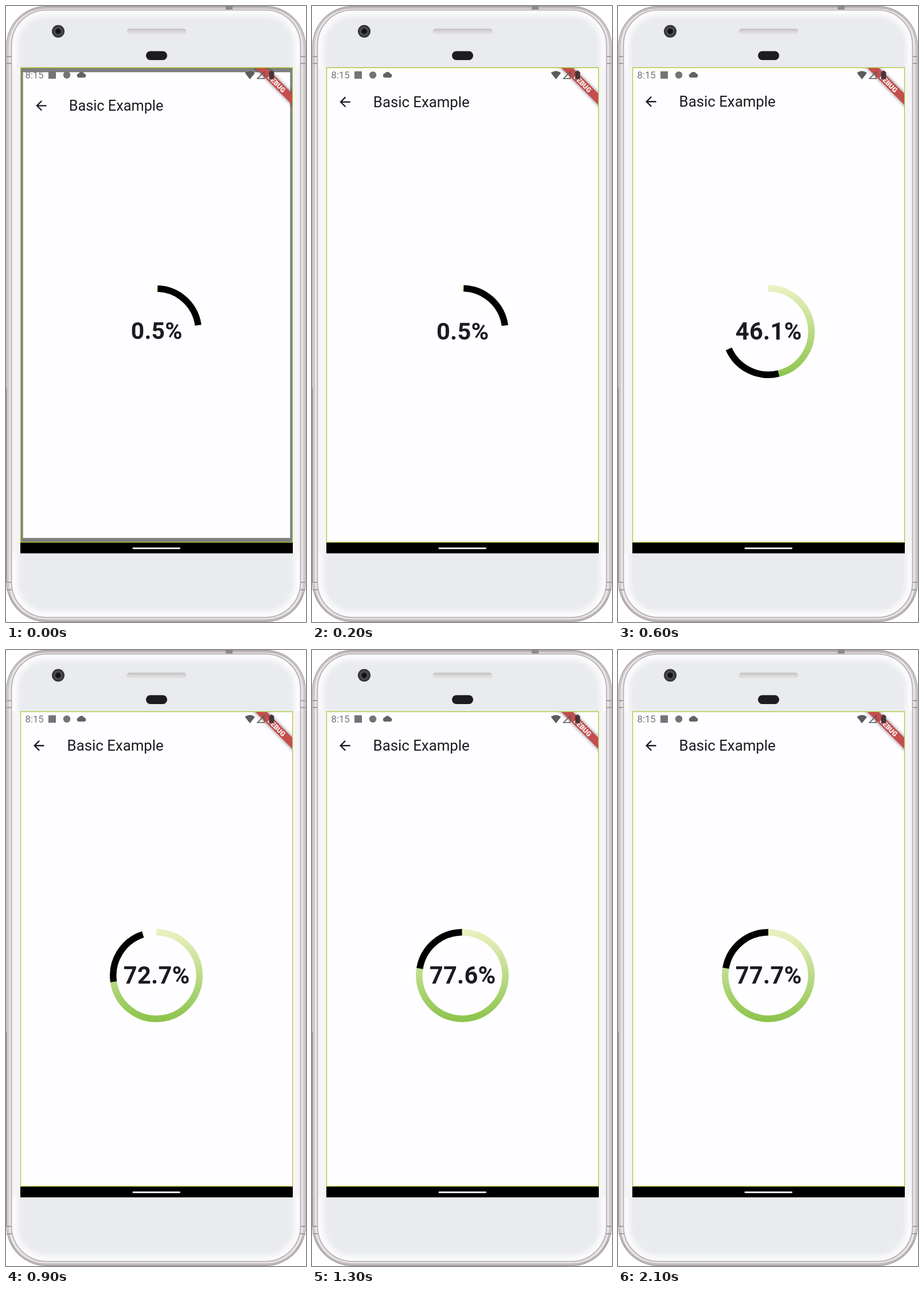
Write an HTML page that moves like this. It is 523 px wide and 1071 px high and loops after 2200 ms.

```html
<!DOCTYPE html>
<html lang="en">
<head>
<meta charset="utf-8">
<title>Circular progress</title>
<style>
  html, body { margin: 0; width: 100%; height: 100%; overflow: hidden; background: #fff; }
  svg { display: block; width: 100vw; height: 100vh; }
  text { font-family: Roboto, "Open Sans", sans-serif; }
</style>
</head>
<body>
<svg viewBox="0 0 523 1071" preserveAspectRatio="none">
  <defs>
    <linearGradient id="lime" gradientUnits="userSpaceOnUse" x1="0" y1="485" x2="0" y2="647">
      <stop offset="0" stop-color="#ecf2c3"/>
      <stop offset="1" stop-color="#8bc34a"/>
    </linearGradient>
    <linearGradient id="metal" x1="0" y1="0" x2="0" y2="1">
      <stop offset="0" stop-color="#bfb9bb"/>
      <stop offset=".07" stop-color="#ddd6d9"/>
      <stop offset=".94" stop-color="#ddd6d9"/>
      <stop offset=".965" stop-color="#b0aaac"/>
      <stop offset="1" stop-color="#c2bcbe"/>
    </linearGradient>
    <linearGradient id="slot" x1="0" y1="0" x2="0" y2="1">
      <stop offset="0" stop-color="#bfbabb"/>
      <stop offset=".4" stop-color="#d8d4d5"/>
      <stop offset="1" stop-color="#e6e3e4"/>
    </linearGradient>
    <radialGradient id="lens">
      <stop offset="0" stop-color="#08080a"/>
      <stop offset=".4" stop-color="#1c1d22"/>
      <stop offset=".55" stop-color="#55565c"/>
      <stop offset=".75" stop-color="#3c3d42"/>
      <stop offset="1" stop-color="#2d2d31"/>
    </radialGradient>
    <filter id="soft" x="-10%" y="-10%" width="120%" height="120%"><feGaussianBlur stdDeviation="4"/></filter>
    <filter id="shade" x="-20%" y="-100%" width="140%" height="300%"><feGaussianBlur stdDeviation="3"/></filter>
    <clipPath id="faceClip"><rect x="11" y="8" width="501" height="1054" rx="60"/></clipPath>
    <clipPath id="screenClip"><rect x="25" y="107" width="475" height="826"/></clipPath>
  </defs>

  <!-- phone body -->
  <rect width="523" height="1071" fill="#fff"/>
  <rect x="1" y=".5" width="521" height="1070" rx="69" fill="url(#metal)" stroke="#958f91"/>
  <rect x="4" y="4" width="515" height="1063" rx="65" fill="#e9e4e6" stroke="#bab3b6"/>
  <g fill="#a19b9d">
    <path d="M1 87h9v2H1zM1 99h9v2H1zM513 87h9v2h-9zM513 99h9v2h-9z"/>
    <path d="M1 1001h9v2H1zM1 1014h9v2H1zM513 1001h9v2h-9zM513 1014h9v2h-9z"/>
  </g>
  <rect x="383" y="0" width="12" height="6" fill="#8d888a"/>
  <rect x="0" y="664" width="1.5" height="338" fill="#9b9597"/>
  <rect x="9.5" y="7" width="504" height="1056" rx="61" fill="#e9ebee" stroke="#b3acaf" stroke-width="1.5"/>
  <g clip-path="url(#faceClip)">
    <rect x="11" y="8" width="501" height="1054" rx="60" fill="none" stroke="#fbfafc" stroke-width="19" filter="url(#soft)"/>
    <rect x="11" y="107" width="14" height="844" fill="#f6f4f7"/>
    <rect x="500" y="107" width="12" height="844" fill="#f6f4f7"/>
  </g>
  <circle cx="91" cy="44" r="11" fill="url(#lens)"/>
  <rect x="210.5" y="39.5" width="104" height="9.5" rx="4.7" fill="url(#slot)"/>
  <rect x="244" y="78.5" width="37" height="15.5" rx="7.5" fill="#1d1d20"/>

  <!-- screen -->
  <rect x="25" y="933" width="475" height="18.6" fill="#000"/>
  <rect x="220.5" y="941.5" width="83.5" height="2.7" rx="1.35" fill="#fff"/>
  <g clip-path="url(#screenClip)">
    <rect x="25" y="107" width="475" height="826" fill="#808080"/>
    <g id="page">
      <rect x="25" y="107" width="475" height="826" fill="#fefdff"/>
      <path transform="translate(43.4 152.4) scale(1.155)" fill="#1d1b20"
        d="M20 11H7.83l5.59-5.59L12 4l-8 8 8 8 1.41-1.41L7.83 13H20z"/>
      <text x="106.6" y="175" font-size="25.8" fill="#1d1b20">Basic Example</text>
      <path id="done" fill="none" stroke="url(#lime)" stroke-width="11.5"/>
      <path id="head" fill="none" stroke="#000" stroke-width="11.5"/>
      <text id="label" x="262.7" y="580" text-anchor="middle" font-size="41.6" font-weight="600" letter-spacing=".29" fill="#1d1b20"></text>
    </g>
    <g transform="translate(499.5 107) rotate(45)">
      <rect x="-60" y="32.3" width="120" height="13.9" fill="#000" opacity=".5" filter="url(#shade)"/>
      <rect x="-60" y="32.3" width="120" height="13.9" fill="#c54d4d"/>
      <text x="0" y="43.5" text-anchor="middle" font-size="11.8" font-weight="900" fill="#fff">DEBUG</text>
    </g>
  </g>

  <!-- status bar -->
  <g fill="#747476">
    <text x="33.6" y="126.4" font-size="16.6">8:15</text>
    <rect x="74" y="113.5" width="13" height="13"/>
    <circle cx="106" cy="120" r="6.2"/>
    <path d="M127 124.5a3.7 3.7 0 0 1-.2-7.3 5.2 5.2 0 0 1 9.4.4 3.5 3.5 0 0 1 .3 6.9z" fill="#626264"/>
    <path d="M416.5 116.3q8.8-6.6 17.6 0L425.3 127.5z" fill="#5c5c5e"/>
    <path d="M438.5 126.3h11.8v-12.2z" fill="none" stroke="#5c5c5e" stroke-width="1.6"/>
    <path d="M461 112.5h4v1.7h2.3v13.2h-8.6v-13.2h2.3z" fill="#493437"/>
  </g>
  <rect x="25.5" y="107.2" width="474" height="825.2" fill="none" stroke="#a9c92f" stroke-width="1.3"/>
</svg>
<script>
  const LOOP = 2200, STEP = 100;
  const START = 416, DURATION = 1320;
  const FIRST = 0.5, GOAL = 77.7, HEAD = 100 - GOAL;
  const CX = 262, CY = 566, RADIUS = 75.2;
  const byId = id => document.getElementById(id);
  const page = byId("page"), done = byId("done"), head = byId("head"), label = byId("label");

  function pointAt(percent) {
    const angle = percent / 100 * 2 * Math.PI;
    return `${CX + RADIUS * Math.sin(angle)} ${CY - RADIUS * Math.cos(angle)}`;
  }

  function arc(from, to) {
    const large = to - from > 50 ? 1 : 0;
    return `M${pointAt(from)}A${RADIUS} ${RADIUS} 0 ${large} 1 ${pointAt(to)}`;
  }

  function progressAt(time) {
    const t = Math.min(1, Math.max(0, (time - START) / DURATION));
    return Math.max(FIRST, GOAL * (1 - (1 - t) ** 6));
  }

  function pageScaleAt(time) {
    return time < 400 ? 1 - 0.0198 * Math.exp(-time / 78) : 1;
  }

  function render(time) {
    const value = progressAt(time);
    const scale = pageScaleAt(time);
    page.setAttribute("transform", `translate(262.5 520) scale(${scale}) translate(-262.5 -520)`);
    done.setAttribute("d", arc(0, value));
    head.setAttribute("d", arc(value, Math.min(value + HEAD, 100)));
    label.textContent = value.toFixed(1) + "%";
  }

  const origin = performance.now();
  function tick() {
    const time = (performance.now() - origin) % LOOP;
    render(Math.floor(time / STEP) * STEP);
    requestAnimationFrame(tick);
  }
  render(0);
  requestAnimationFrame(tick);
</script>
</body>
</html>
```
